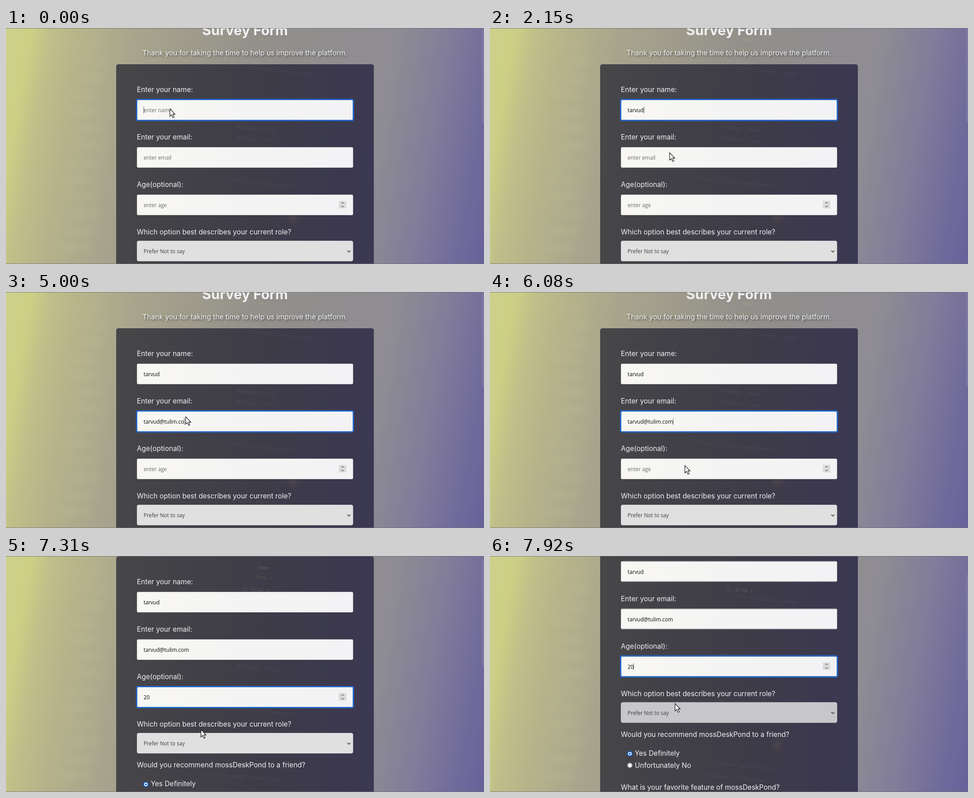
Write an HTML page that moves like this. It is 1063 px wide and 527 px high and loops after 8000 ms.

```html
<!DOCTYPE html>
<html lang="en">
<head>
<meta charset="utf-8">
<title>Survey Form</title>
<style>
html, body { margin: 0; width: 100%; height: 100%; overflow: hidden; }
#stage { position: relative; width: 1063px; height: 527px; overflow: hidden;
  background: linear-gradient(100deg, #ced18a 0, #cccf85 5%, #c0be89 9%, #b6b38b 15%, #a8a58d 25%,
    #928f8b 50%, #8f8d93 75%, #817c9a 86%, #6f699b 95%, #68629b 100%); }
#stage * { position: absolute; box-sizing: border-box; white-space: pre; }
#stage .text { font: 15.5px/20px Inter, sans-serif; color: #f0f0f2; }
.blur { width: 70px; height: 17px; border-radius: 8px; background: #c0bf94; opacity: .2; filter: blur(7px); }
.code { font: 11px/13px "DejaVu Sans Mono", monospace; transform: rotate(6deg); filter: blur(.6px); }
#form, #content { left: 0; top: 0; width: 1063px; height: 1200px; }
#card { left: 245px; top: 81px; width: 573px; height: 1100px; border-radius: 5px;
  background: linear-gradient(92deg, #474648, #403e47 40%, #3d3b4a 65%, #3a3753); }
#stage .centre { left: 0; width: 1063px; text-align: center; font-size: 15.7px; text-shadow: 2px 2px 4px #0008; }
#stage .title { font-size: 30.8px; line-height: 40px; font-weight: 700; text-shadow: none; }
.box { left: 291px; width: 481px; height: 46px; border-radius: 2.5px; border: 1px solid #d2d2d4;
  background: linear-gradient(90deg, #f8f7f3, #f4f4f4 50%, #f3f3f5); }
.box.focus { outline: 3px solid #2365c4; outline-offset: -1px; }
#stage .box .value { left: 14px; top: 12px; font: 11.7px/20px "Open Sans", sans-serif; color: #0a0a0a; }
#stage .box .hint { color: #6c6c6c; }
.box i { top: 14.5px; width: 1px; height: 15px; background: #555; }
#role { background: #e0e0e1; border-color: #ccc; border-radius: 4px; }
#role.hover { background: #c7c6cb; }
#stage #role .value { color: #3c3c40; }
.radio { left: 305px; width: 12px; height: 12px; border-radius: 50%; border: 2px solid #9a9aa6; background: #fff; }
.radio.on { border-color: #0b5fd6; background: radial-gradient(circle, #0b5fd6 1.6px, #fff 2.6px); }
svg { overflow: visible; fill: none; }
.edge { left: 0; top: 0; width: 1063px; height: 527px; border: solid #6c6b70; border-width: 1px 0; opacity: .8; }
#thumb { left: 1059px; width: 3px; height: 235px; border-radius: 2px; background: #8a87a8; opacity: .6; }
</style>
</head>
<body>
<div id="stage">
  <div id="backdrop"></div>
  <div id="form"><div id="card"></div></div>
  <div id="code"></div>
  <div id="content"></div>
  <div id="thumb"></div>
  <div class="edge"></div>
  <svg id="pointer" width="14" height="22"><path d="M.5 .5V17L4.4 13.5L7 20L9.8 18.8L7.2 12.5H12Z" fill="#fff" stroke="#222" stroke-width="1.3"/></svg>
</div>
<script>
const $ = id => document.getElementById(id);
const form = $('form'), content = $('content');

function add(parent, cls, style, text = '', tag = 'div') {
  const el = document.createElement(tag);
  el.className = cls;
  Object.assign(el.style, style);
  el.textContent = text;
  parent.append(el);
  return el;
}
const label = (y, text, x = 291) => add(content, 'text', { left: x + 'px', top: y - 10 + 'px' }, text);
const centred = (y, cls, half, text) => add(content, 'text centre ' + cls, { top: y - half + 'px' }, text);

// Soft streaks and faint code lines stay put while the form scrolls.
for (let i = 0; i < 13; i++)
  add($('backdrop'), 'blur', { left: 150 - i * 2 + 10 * Math.sin(i * 1.4) + 'px', top: 28 + i * 37.8 + 'px' });
const faint = (x, y, text, color, opacity) =>
  add($('code'), 'code', { left: x + 'px', top: y + 'px', color, opacity }, text);
faint(560, 20, '(oor', '#c5bd6c', .3);
faint(553, 42, 'item =', '#c5bd6c', .18);
faint(526, 70, '}; else {', '#d8d4a0', .2);
faint(545, 90, 'function(value, item)', '#8c88a8', .13);
faint(512, 218, 'display: none;', '#a5a2b8', .14);
faint(514, 243, 'display: flex;', '#a5a2b8', .12);
faint(455, 338, 'return function addElement(e)', '#a09cb0', .1);
faint(495, 462, 'function append(node)', '#a5a2b8', .1);
faint(470, 488, 'className: item-title', '#a5a2b8', .1);
add($('code'), 'blur', { left: '630px', top: '414px', width: '18px', background: '#b08058' });

centred(5, 'title', 20, 'Survey Form');
centred(55.5, '', 10, 'Thank you for taking the time to help us improve the platform.');
label(137.5, 'Enter your name:');
label(243.5, 'Enter your email:');
label(349.5, 'Age(optional):');
label(455.5, 'Which option best describes your current role?');
label(546.5, 'Would you recommend mossDeskPond to a friend?');
label(589, 'Yes Definitely', 322);
label(615.5, 'Unfortunately No', 322);
label(664.5, 'What is your favorite feature of mossDeskPond?');
add(content, 'radio on', { top: '583.5px' });
add(content, 'radio', { top: '610px' });

function box(y) {
  const el = add(content, 'box', { top: y + 'px' });
  return { el, value: add(el, 'value', {}), caret: add(el, '', {}, '', 'i') };
}
function chevrons(el, d, x, y, color) {
  el.insertAdjacentHTML('beforeend', `<svg style="left:${x}px;top:${y}px" width="17" height="17">
    <path d="${d}" stroke="${color}" stroke-width="1.5"/></svg>`);
}

// keys: the tick at which each character appears; off: spans where the caret is hidden
const fields = [
  { ...box(160), hint: 'enter name', text: 'tarvud', from: 0, to: 30,
    keys: [6, 7, 9, 10, 16, 16], off: [[3, 6]] },
  { ...box(266), hint: 'enter email', text: 'tarvud@tulim.com', from: 30, to: 80,
    keys: [36, 37, 39, 39, 40, 42, 51, 54, 56, 57, 59, 61, 63, 64, 65, 67], off: [[43, 50], [70, 77]] },
  { ...box(372), hint: 'enter age', text: '20', from: 80, to: 104,
    keys: [86, 86], off: [[93, 100]] }
];
const spin = add(fields[2].el, '', { left: '448px', top: '13px', width: '17px', height: '17px', background: '#dddcdd' });
chevrons(spin, 'M5.5 6L8.5 3L11.5 6M5.5 11L8.5 14L11.5 11', 0, 0, '#77777a');
const role = box(475);
role.el.id = 'role';
role.value.textContent = 'Prefer Not to say';
role.caret.remove();
chevrons(role.el, 'M1 1L4.5 4.5L8 1', 466, 20, '#333');

const TICK = 1000 / 13, LOOP = 8000;
const scrolls = [2, 12.3, 80, 147.5, 148.5];
// start tick, end tick, starting x and y of each pointer move
const moves = [[22, 28, 364, 180], [73, 79, 399, 278], [98, 103, 433, 387], [104, 105, 411, 329]];

function pointerAt(n) {
  let [, , x, y] = moves[0];
  moves.slice(0, -1).forEach(([a, b, x0, y0], i) => {
    const [, , x1, y1] = moves[i + 1];
    let p = Math.min(1, Math.max(0, (n - a) / (b - a)));
    p = p * p * (3 - 2 * p);
    if (n >= a) [x, y] = [x0 + (x1 - x0) * p, y0 + (y1 - y0) * p];
  });
  return [x, y];
}

function draw(t) {
  const n = Math.floor((t + 9) / TICK);
  const scroll = n < 93 ? 0 : scrolls[Math.min(n - 93, 4)];
  const [x, y] = pointerAt(n);
  form.style.transform = content.style.transform = `translateY(${-scroll}px)`;
  $('thumb').style.top = -24 + scroll * .44 + 'px';
  $('pointer').style.transform = `translate(${x}px,${y}px)`;
  role.el.classList.toggle('hover', y > 475 - scroll && y < 521 - scroll);
  for (const f of fields) {
    const count = f.keys.filter(k => k <= n).length;
    const focus = n >= f.from && n < f.to;
    f.value.textContent = count ? f.text.slice(0, count) : f.hint;
    f.value.classList.toggle('hint', !count);
    f.el.classList.toggle('focus', focus);
    f.caret.hidden = !focus || f.off.some(([a, b]) => n >= a && n < b);
    f.caret.style.left = 14 + (count ? f.value.offsetWidth : 0) + 'px';
  }
}

const start = performance.now();
function loop() {
  draw((performance.now() - start) % LOOP);
  requestAnimationFrame(loop);
}
loop();
</script>
</body>
</html>
```
